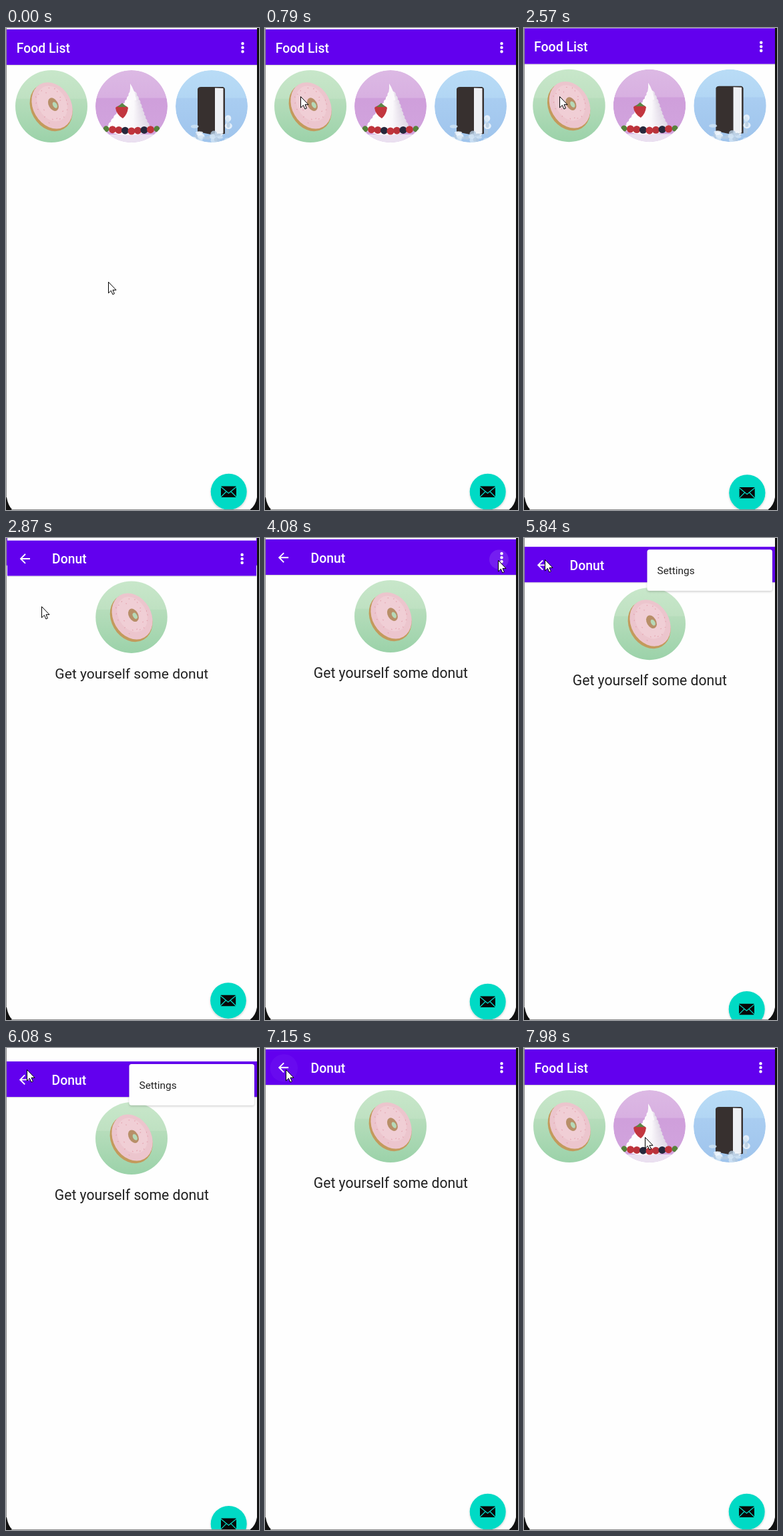
Write an HTML page that moves like this. It is 379 px wide and 720 px high and loops after 8000 ms.

```html
<!DOCTYPE html>
<html lang="en">
<head>
<meta charset="utf-8">
<title>Food List</title>
<style>
  html, body { margin: 0; width: 100%; height: 100%; overflow: hidden; background: #fefefe; }
  svg { display: block; font-family: Roboto, sans-serif; }
  .title { font-size: 19.4px; font-weight: 500; fill: #fff; }
</style>
</head>
<body>
<svg width="379" height="720" viewBox="0 0 379 720">
  <defs>
    <linearGradient id="green" x2="0" y2="1">
      <stop offset="0" stop-color="#c8e7ca"/><stop offset=".39" stop-color="#bfe1c2"/>
      <stop offset=".4" stop-color="#b6ddbb"/><stop offset="1" stop-color="#9bd2a9"/>
    </linearGradient>
    <linearGradient id="violet" x2="0" y2="1">
      <stop offset="0" stop-color="#dcb9e4"/><stop offset=".38" stop-color="#d8b0e1"/>
      <stop offset=".39" stop-color="#cf9fdb"/><stop offset="1" stop-color="#d2a5de"/>
    </linearGradient>
    <linearGradient id="blue" x2="0" y2="1">
      <stop offset="0" stop-color="#b9dcf6"/><stop offset=".38" stop-color="#b2d6f4"/>
      <stop offset=".39" stop-color="#a9cdf1"/><stop offset="1" stop-color="#9fc4ec"/>
    </linearGradient>
    <linearGradient id="cream">
      <stop offset="0" stop-color="#fff"/><stop offset=".6" stop-color="#faf8fb"/><stop offset="1" stop-color="#e0d8e6"/>
    </linearGradient>
    <filter id="shade" x="-20%" y="-20%" width="140%" height="150%">
      <feDropShadow dx="0" dy="1.5" stdDeviation="1.5" flood-opacity=".2"/>
    </filter>
    <clipPath id="round"><circle r="54"/></clipPath>

    <g id="donut">
      <circle r="54" fill="url(#green)"/>
      <g transform="rotate(-30)">
        <ellipse cx="-1" cy="1" rx="30" ry="37.5" fill="#c39a5c"/>
        <ellipse cx="1.5" cy="-.5" rx="28.5" ry="36.5" fill="#ecc5cd"/>
        <ellipse cx="3" cy="-3" rx="21" ry="28" fill="#f0ced5"/>
        <ellipse cx="4" cy="-1" rx="7" ry="10.5" fill="#b78f68"/>
        <ellipse cx="5.5" cy="1" rx="3" ry="5" fill="#b5d9b7"/>
        <g id="sprinkles" stroke="#e3a0ac" stroke-linecap="round"/>
      </g>
    </g>

    <g id="sundae" clip-path="url(#round)">
      <circle r="54" fill="url(#violet)"/>
      <path d="M-38 42H38L30 54H-30Z" fill="#eae0f0"/>
      <g id="swirl" fill="url(#cream)"/>
      <path d="M-2-34Q5-24 7-9H-7Q-1-20-2-34Z" fill="#fbf9fc"/>
      <path d="M-24 2Q-14-6-5 2Q-6 12-13 18Q-23 12-24 2Z" fill="#c2363f"/>
      <path d="M-21 1L-14-5L-7 1Z" fill="#5a8745"/>
      <g id="berries"/>
    </g>

    <g id="sandwich" clip-path="url(#round)">
      <circle r="54" fill="url(#blue)"/>
      <path d="M-21-26Q-20-29-16-29H17Q20-28 20-25V41L4 43L-21 38Z" fill="#37302f"/>
      <path d="M5-27.5L17.500-27V40L5 42Z" fill="#eef0f4"/>
      <g id="splash"/>
    </g>

    <g id="page">
      <rect x="1" y="-21" width="375" height="762" fill="#fefefe"/>
      <rect x="1" y="55" width="375" height="1.200" opacity=".15"/>
      <rect x="1" y="2" width="375" height="53" fill="#6200ee"/>
      <path d="M354.500 23.300v0m0 6v0m0 6v0" stroke="#fff" stroke-width="4.500" stroke-linecap="round"/>
      <circle cx="333.700" cy="692.800" r="27" fill="#03dac5" filter="url(#shade)"/>
      <rect x="322" y="684.500" width="23" height="16.500" rx="1" fill="#080808"/>
      <path d="M322 685.500L333.500 695L345 685.500M322 700.500L330 692.500M345 700.500L337 692.500" fill="none" stroke="#03dac5" stroke-width="1.200"/>
    </g>
  </defs>

  <g id="list">
    <use href="#page"/>
    <text class="title" x="15.800" y="36.700">Food List</text>
    <use href="#donut" x="68" y="117"/>
    <use href="#sundae" x="188" y="117"/>
    <use href="#sandwich" x="308" y="117"/>
  </g>

  <g id="detail">
    <use href="#page"/>
    <circle id="ripple" fill="#fff"/>
    <path transform="translate(16 17.800) scale(.96)" fill="#fff" d="M20 11H7.830l5.590-5.590L12 4l-8 8 8 8 1.410-1.410L7.830 13H20z"/>
    <text class="title" x="68.500" y="36.700">Donut</text>
    <use href="#donut" x="188" y="117"/>
    <text x="188.300" y="209" font-size="21.200" text-anchor="middle" fill="#212121">Get yourself some donut</text>
    <g id="menu">
      <rect x="184.500" y="6" width="187.500" height="61.500" rx="3.500" fill="#fefefe" filter="url(#shade)"/>
      <text x="199.500" y="42.700" font-size="15.400" fill="#212121">Settings</text>
    </g>
  </g>

  <path d="M0 0H1V701Q3 713 9 719V720H0ZM379 0H376V701Q374 713 366 719V720H379Z" fill="#111"/>
  <path d="M.5 0V701M8 719.500H366" stroke="#8c8c8c"/>
  <path id="cursor" d="M.5.5V17L4.400 13.300L6.900 19L9.400 17.900L7 12.400H12Z" fill="#fff" stroke="#000" stroke-linejoin="round"/>
</svg>
<script>
const $ = id => document.getElementById(id);
const set = (id, attrs) => { for (const k in attrs) $(id).setAttribute(k, attrs[k]); };
const fill = (id, n, part) => { $(id).innerHTML = Array.from({ length: n }, (_, i) => part(i)).join(''); };
const ramp = (t, from, to) => Math.min(1, Math.max(0, (t - from) / (to - from)));
const easeOut = u => 1 - (1 - u) ** 3;
const mix = (a, b, u) => a + (b - a) * u;
const zoom = (s, x, y) => `translate(${x} ${y}) scale(${s}) translate(${-x} ${-y})`;

let seed = 7;
const random = () => (seed = seed * 16807 % 2147483647) / 2147483647;

fill('sprinkles', 22, i => {
  const r = mix(.5, .92, random()), a = i * 2.4;
  return `<path d="M${2 + 27 * r * Math.cos(a)} ${-1 + 34 * r * Math.sin(a)}l${Math.cos(i)} ${Math.sin(i)}"/>`;
});
// Widest tier first, each next one smaller and higher.
fill('swirl', 10, i => {
  const v = 1 - i / 12;
  return `<ellipse cx="${3 * Math.sin(5 * v) - 1}" cy="${67 * v - 34}" rx="${34 * v ** 1.2}" ry="${4 + 6 * v}"/>`;
});
fill('berries', 9, i => {
  const x = i * 9.5 - 38;
  const color = i % 8 ? ['#26283c', '#c0343c', '#b9323a'][i % 3] : '#56823b';
  return `<circle cx="${x}" cy="${37 - Math.abs(x) / 12}" r="${i % 8 ? 5.5 : 4.5}" fill="${color}"/>`;
});
fill('splash', 45, i => {
  const y = mix(16, 52, Math.sqrt(random())), x = mix(-1, 1, random()) * 30;
  const color = ['#f4f9fe', '#d3e5f6', '#b4cbe2'][i % 3];
  const clear = Math.abs(x) < 22 && y < 38;
  return `<ellipse cx="${x}" cy="${y}" rx="${mix(2, 6, random())}" ry="${mix(2, 5, random())}" fill="${color}" opacity="${clear ? 0 : .8}"/>`;
});

const LOOP = 8000;
const FRAME = 135.5, PHASE = 373.5;  // the screen refreshes in steps
const sample = t => 400 + FRAME * Math.floor((t - PHASE) / FRAME);

// Pointer stops: time, x, y
const stops = [
  [264, 153, 379], [535, 66, 178], [806, 53, 102], [3110, 53, 102], [3381, 260, 52],
  [3652, 348, 33], [4465, 350, 33], [4736, 169, 78], [5142, 70, 51], [5413, 31, 32],
  [7717, 31, 32], [7988, 181, 133]
];
function pointer(t) {
  const i = Math.max(1, stops.findIndex(s => s[0] >= t));
  const [from, x0, y0] = stops[i - 1], [to, x1, y1] = stops[i];
  const u = ramp(t, from, to);
  return [mix(x0, x1, u), mix(y0, y1, u)];
}

// A tap glow spreads from the pointer to the middle of its icon.
function glow(t, x, y) {
  const [iconX, start] = t < 5000 ? [354.5, 3960] : [27.5, 6900];
  const u = ramp(t, start, start + 368);
  return {
    cx: mix(x, iconX, u), cy: mix(y, 29.3, u), r: 11 + 13 * u,
    opacity: u ? .16 * (1 - u) : 0
  };
}

function draw(now) {
  const t = sample(now % LOOP);
  const [x, y] = pointer(t);
  const open = easeOut(ramp(t, 2555, 2975)), close = easeOut(ramp(t, 7650, 7985));
  const drop = 19 * Math.sin(Math.PI * ramp(t, 5685, 6362));
  const menuIn = ramp(t, 4466, 4736), menuOut = ramp(t, 6091, 6362);

  set('list', { transform: zoom(close ? mix(1.1, 1, close) : 1 + .05 * open, 188.5, 350) });
  set('detail', {
    transform: `translate(0 ${drop}) ${zoom(mix(.85, 1, open) - .1 * close, 188.5, 350)}`,
    opacity: open > .4 && close < .6 ? 1 : 0
  });
  set('menu', { transform: zoom(mix(.85, 1, menuIn), 372, 6), opacity: menuIn - menuOut });
  set('ripple', glow(t, x, y));
  set('cursor', { transform: `translate(${Math.round(x)} ${Math.round(y)})` });
}

const start = performance.now();
function tick() {
  draw(performance.now() - start);
  requestAnimationFrame(tick);
}
tick();
</script>
</body>
</html>
```
